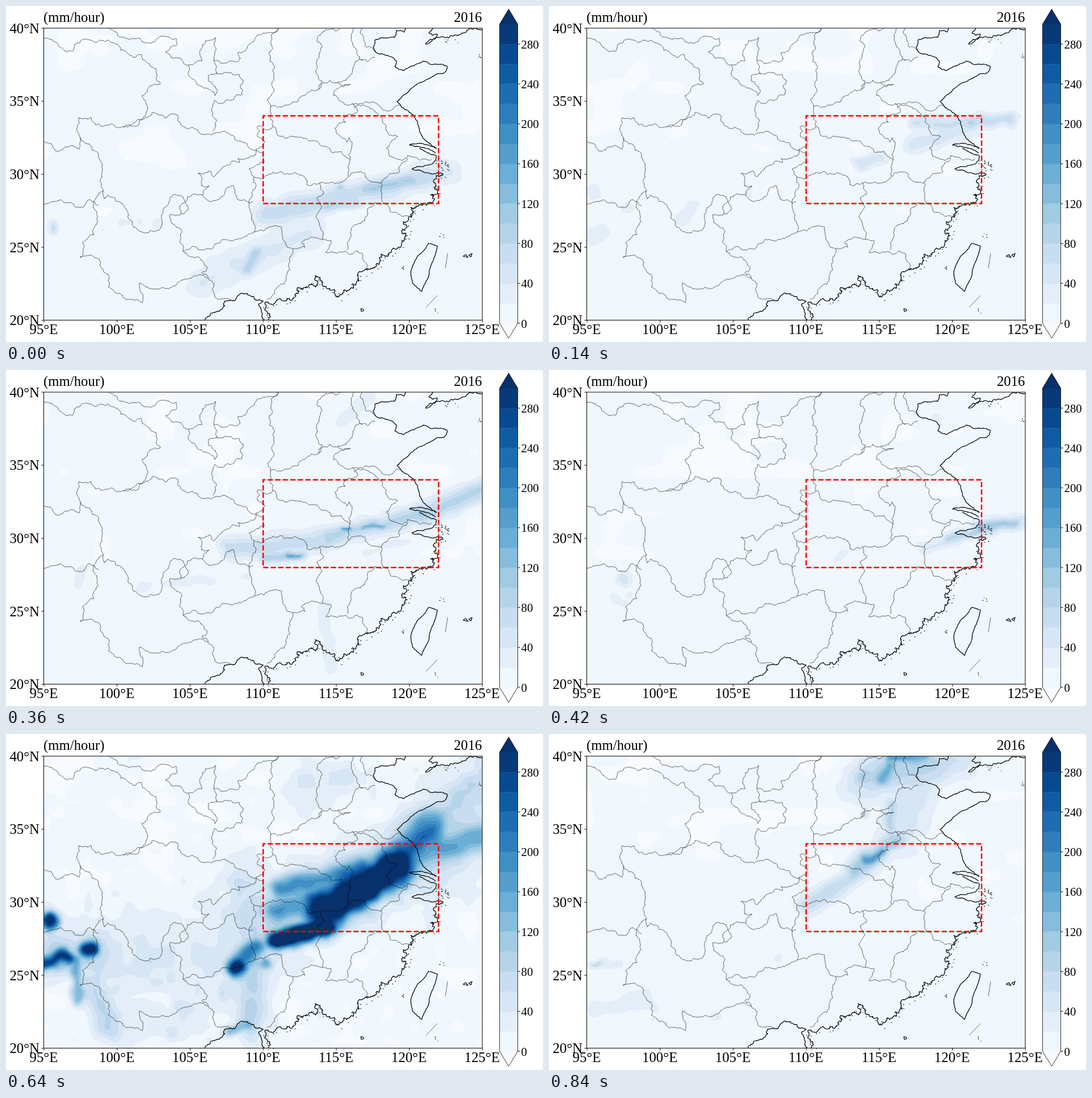
These frames come from a looping animation (946x592 px, 0.98 s). An HTML page with a canvas:

```html
<!DOCTYPE html>
<html lang="en">
<head>
<meta charset="utf-8">
<title>Rainfall map</title>
<style>
html, body { margin: 0; width: 100%; height: 100%; overflow: hidden; background: #fff; }
canvas { position: absolute; left: 67px; top: 39px; }
svg { position: absolute; left: 0; top: 0; }
text { font-family: "Liberation Serif", "Times New Roman", serif; font-size: 24.8px; }
</style>
</head>
<body>
<canvas id="rain" width="772" height="515"></canvas>
<svg id="map" width="946" height="592" viewBox="0 0 946 592"></svg>
<script>
const LEFT = 67, TOP = 39, W = 772, H = 515, DEG = 25.74, HOLD = 140;
const svg = document.getElementById('map');
const ctx = document.getElementById('rain').getContext('2d');

function add(tag, attrs, text) {
  const el = document.createElementNS('http://www.w3.org/2000/svg', tag);
  for (const k in attrs) el.setAttribute(k, attrs[k]);
  if (text) el.textContent = text;
  svg.appendChild(el);
  return el;
}

const mix = (a, b, t) => a + (b - a) * t;
const ease = t => t * t * (3 - 2 * t);
function hash(x, y) {
  const s = Math.sin(x * 127.1 + y * 311.7) * 43758.5453;
  return (s - Math.floor(s)) * 2 - 1;
}
function noise(x, y) {
  const i = Math.floor(x), j = Math.floor(y), u = ease(x - i), v = ease(y - j);
  return mix(mix(hash(i, j), hash(i + 1, j), u), mix(hash(i, j + 1), hash(i + 1, j + 1), u), v);
}

// ---- colour scale: 15 bands of 20, plus one colour beyond each end
const anchors = ['f7fbff', 'deebf7', 'c6dbef', '9ecae1', '6baed6', '4292c6', '2171b5', '08519c', '08306b']
  .map(h => [0, 2, 4].map(i => parseInt(h.slice(i, i + 2), 16)));
function shade(t) {
  const i = Math.min(7, Math.floor(t * 8));
  return anchors[i].map((c, k) => Math.round(mix(c, anchors[i + 1][k], t * 8 - i)));
}
const palette = Array.from({ length: 17 }, (_, k) => shade(Math.min(1, Math.max(0, (k - 0.5) / 15))));
const rgb = k => `rgb(${palette[k]})`;

// ---- rain: bands that fall off smoothly around a segment
const band = (x1, y1, x2, y2, width, peak) => ({ x: x1, y: y1, dx: x2 - x1, dy: y2 - y1, width, peak });
const spot = (x, y, width, peak) => band(x, y, x, y, width, peak);
const showers = (count, x, y, spreadX, spreadY, peak) => Array.from({ length: count }, (_, i) =>
  spot(x + spreadX * hash(i, x), y + spreadY * hash(y, i), 11 + 4 * hash(i, i + 2), peak));

const scenes = [
  { rain: [
    band(460, 366, 740, 303, 21, 64), band(560, 352, 620, 348, 10, 72), band(640, 320, 715, 306, 13, 84),
    band(720, 306, 780, 290, 22, 34), spot(588, 321, 9, 85), band(345, 485, 530, 400, 30, 34),
    band(427, 462, 443, 434, 14, 85), spot(82, 391, 11, 65), ...showers(5, 230, 390, 40, 16, 19)] },
  { rain: [
    band(650, 207, 740, 206, 13, 58), band(740, 207, 815, 197, 13, 68), band(640, 246, 740, 215, 17, 40),
    band(545, 277, 585, 266, 13, 46), band(230, 375, 250, 354, 12, 30), band(75, 405, 92, 398, 15, 26),
    spot(78, 328, 14, 28), spot(138, 355, 11, 30), spot(352, 328, 12, 20)] },
  { rain: [
    band(395, 314, 560, 300, 19, 62), band(455, 328, 520, 327, 10, 88), band(495, 327, 518, 327, 6, 145),
    band(570, 294, 735, 254, 16, 78), band(590, 283, 610, 282, 5, 160), band(630, 278, 662, 275, 5, 135),
    band(735, 254, 840, 212, 20, 78), band(235, 380, 430, 362, 16, 19), band(131, 355, 131, 380, 9, 30),
    band(560, 410, 572, 525, 13, 24), band(635, 320, 710, 300, 13, 17), band(595, 92, 640, 48, 13, 22)] },
  { rain: [
    band(660, 313, 720, 293, 14, 44), band(705, 297, 760, 280, 9, 80), band(755, 278, 820, 270, 9, 98),
    band(750, 280, 840, 266, 14, 58), spot(132, 366, 13, 52), band(510, 332, 522, 322, 8, 22),
    spot(683, 82, 12, 18), ...showers(4, 120, 398, 24, 18, 17)] },
  { base: 8, rough: 13, rain: [
    band(562, 310, 690, 230, 34, 430), band(475, 362, 560, 341, 18, 430), band(440, 375, 412, 402, 19, 200),
    spot(407, 411, 17, 350), band(690, 225, 745, 168, 36, 225), band(740, 212, 850, 174, 30, 140),
    band(750, 165, 845, 75, 42, 72), band(485, 272, 620, 238, 23, 185), band(475, 312, 550, 292, 23, 165),
    band(440, 330, 800, 185, 68, 72), band(410, 250, 450, 300, 38, 48), band(435, 400, 432, 510, 30, 76),
    spot(455, 406, 12, 145), band(392, 522, 430, 512, 10, 135), band(200, 390, 400, 405, 72, 38),
    spot(77, 329, 16, 330), spot(147, 377, 16, 350), band(66, 403, 108, 391, 15, 290),
    band(90, 380, 150, 390, 42, 85), band(124, 395, 128, 466, 12, 135), band(150, 440, 182, 515, 28, 72),
    band(520, 85, 600, 80, 42, 35), band(215, 510, 330, 490, 36, 28), ...showers(12, 270, 460, 160, 70, 46)] },
  { rain: [
    spot(123, 410, 9, 105), band(103, 415, 130, 408, 10, 64), spot(97, 367, 13, 23),
    band(145, 400, 168, 438, 15, 24), band(690, 305, 735, 302, 26, 22), band(735, 300, 742, 335, 14, 34),
    band(597, 381, 614, 374, 8, 21), band(625, 352, 665, 347, 7, 17)] },
  { rain: [
    band(555, 76, 670, 50, 38, 82), band(588, 80, 598, 58, 16, 135), spot(556, 76, 16, 110),
    band(600, 40, 660, 40, 13, 158), band(660, 55, 720, 45, 32, 52), band(602, 165, 604, 125, 14, 76),
    band(620, 175, 650, 85, 38, 44), spot(553, 140, 9, 58), band(455, 300, 555, 238, 20, 74),
    band(535, 240, 608, 188, 17, 100), band(556, 223, 586, 209, 8, 150), band(610, 180, 665, 172, 16, 34),
    band(78, 405, 90, 405, 5, 75), band(75, 405, 118, 405, 9, 34), band(85, 485, 165, 465, 24, 18),
    spot(405, 396, 13, 18), ...showers(5, 230, 500, 70, 26, 16)] }
];

function rainAt(x, y, bands) {
  let sum = 0;
  for (const b of bands) {
    const px = x - b.x, py = y - b.y, len2 = b.dx ** 2 + b.dy ** 2;
    const t = len2 && Math.min(1, Math.max(0, (px * b.dx + py * b.dy) / len2));
    const q = ((px - t * b.dx) ** 2 + (py - t * b.dy) ** 2) / b.width ** 2;
    if (q < 8) sum += (b.peak * Math.exp(-q)) ** 3;
  }
  return Math.cbrt(sum);
}

function paintField({ rain, base = 9, rough = 3 }, seed) {
  const step = 4, cols = W / step + 2, rows = Math.ceil(H / step) + 2;
  const grid = new Float32Array(cols * rows);
  for (let j = 0; j < rows; j++) for (let i = 0; i < cols; i++) {
    const x = LEFT + i * step, y = TOP + j * step;
    const warpX = 5 * noise(x / 19 + seed * 9, y / 19);
    const warpY = 4 * noise(x / 19, y / 19 + seed * 7 + 40);
    const dry = 26 * (1 - j / rows) * Math.max(0, noise(x / 55 + seed * 13, y / 36));
    grid[j * cols + i] = base + rough * noise(x / 24 + seed * 31, y / 20) - dry
      + rainAt(x + warpX, y + warpY, rain);
  }
  const img = ctx.createImageData(W, H);
  for (let y = 0, o = 0; y < H; y++) for (let x = 0; x < W; x++, o += 4) {
    const i = x / step | 0, j = y / step | 0, u = x / step - i, n = j * cols + i;
    const v = mix(mix(grid[n], grid[n + 1], u), mix(grid[n + cols], grid[n + cols + 1], u), y / step - j);
    img.data.set(palette[Math.max(0, Math.min(16, Math.floor(v / 20) + 1))], o);
    img.data[o + 3] = 255;
  }
  return img;
}
const fields = scenes.map(paintField);

// ---- map lines: a few key points, roughened by midpoint displacement
function roughen(a, b, k) {
  const dx = b[0] - a[0], dy = b[1] - a[1];
  if (Math.hypot(dx, dy) < 2.5) return [b];
  const h = hash(a[0] + b[1], a[1] - b[0]) * k;
  const m = [(a[0] + b[0]) / 2 - dy * h, (a[1] + b[1]) / 2 + dx * h];
  return [...roughen(a, m, k), ...roughen(m, b, k)];
}
function line(points, width, k) {
  const keys = points.split(' ').map(s => s.split(',').map(Number));
  const path = keys.flatMap((p, i) => i ? roughen(keys[i - 1], p, k) : [p]);
  add('path', { d: 'M' + path.map(p => p.map(n => n.toFixed(1))).join('L'), fill: 'none', stroke: '#000',
    'stroke-width': width, 'stroke-linejoin': 'round', 'clip-path': 'url(#frame)' });
  return path;
}
const border = points => line(points, 0.6, 0.22);
const coast = (points, k = 0.12) => line(points, 1.25, k);
function islets(count, x, y, spreadX, spreadY) {
  for (let i = 0; i < count; i++)
    add('ellipse', { cx: x + spreadX * hash(i, x), cy: y + spreadY * hash(y, i), rx: 0.9 + 0.5 * hash(i, 3), ry: 0.7 });
}

add('clipPath', { id: 'frame' }).innerHTML = `<rect x="${LEFT}" y="${TOP}" width="${W}" height="${H}"/>`;

// north-west
border('67,57 117,80 120,69 140,58 192,66 202,78 264,110 272,137 240,157 246,167 240,199 222,212 207,213');
border('180,39 222,57 262,63 300,57 301,68 281,80 291,91 322,104 345,97 343,78 370,55 366,95 392,98 413,93 408,83 437,62 480,39');
border('322,104 323,124 347,144 368,158 371,147 357,133 357,122 373,118');
border('366,95 373,120 398,119 419,132 412,142 416,156 395,167 368,166 362,180 365,221');
border('128,197 150,197 170,212 207,213 232,200 258,187 280,198 303,193 303,203 338,219 400,228 425,243 453,262');
border('128,197 130,230 147,243 163,262 172,325');
border('67,239 80,243 95,255 112,247 129,252 130,232');
// south-west
border('67,350 95,341 132,355 148,341 163,352');
border('172,325 163,330 162,380 155,403 135,418 130,443 165,447 180,473 180,495 212,518 240,523 235,488 298,493 356,479 368,512 395,518');
border('172,325 173,340 180,333 209,355 225,390 255,395 271,393 273,370 286,350 297,332 315,342 308,367');
border('346,333 316,345 320,360 288,368 310,398 312,432 333,443 354,463 345,470 356,479');
border('312,432 343,430 372,418 415,410 437,398 470,388 486,390 487,410 505,428');
// centre
border('440,252 440,262 409,268 411,276 366,301 358,290 338,295 344,317 358,317 346,333 360,345 400,316 407,340 435,345');
border('453,262 455,275 428,287 437,302 433,330 430,358 437,398');
border('466,178 470,212 443,212 443,230 456,238 440,252');
border('470,212 492,233 558,247 590,256 606,272 604,300 553,312');
border('437,302 470,293 527,303 530,315 553,312 560,328 548,338 556,355 546,370 557,411');
border('505,428 527,425 520,417 557,411 572,413 563,434 617,432 628,437 636,466');
border('505,428 500,465 490,490 460,517');
// north-east
border('480,39 468,50 463,85 472,130 460,165 466,178 515,168 549,148 557,132 548,105 557,72 548,62 551,52 590,39');
border('613,39 610,68 618,85 637,98 650,90');
border('628,39 630,60 634,72 652,82');
border('549,148 556,137 585,134 617,97 628,95');
border('585,134 607,138 577,158 610,172 655,173 672,185 695,175');
border('610,172 620,185 595,195 598,205 580,215 600,240 604,232 606,272');
border('613,180 655,190 670,220 690,230 670,250 676,265 738,270 750,270');
border('708,268 670,303 661,312 666,348 678,363 718,368');
border('604,300 632,295 643,310 661,312');
border('666,348 637,357 632,378 616,385 602,430');
line('778,436 774,462', 0.6, 0);
line('760,510 740,531', 0.6, 0);

// coasts and islands
coast('704,39 701,46 688,43 685,55 660,56 650,60 647,72 652,82 680,90 688,97 685,107 700,114 712,107 735,97 748,103 777,106 773,117 735,133 700,157 689,168 708,184 727,212 732,228 758,251 725,242 711,245 730,249 757,259');
coast('728,251 757,263 757,272 735,283 715,287 745,294 758,295');
const southCoast = coast('758,295 770,297 757,313 760,328 748,333 755,340 715,372 700,380 706,390 697,397 703,408 660,438 636,465 558,493 545,475 545,495 510,507 462,523 460,540 466,547 462,553', 0.42);
coast('455,553 445,525 453,520 430,510 410,510 385,520 365,540 350,554', 0.25);
coast('752,39 745,48 760,50 739,67 785,52 815,41 839,41', 0.2);
coast('745,418 760,423 747,462 732,503 716,488 714,465 728,438 745,418', 0.07);
coast('805,441 810,438 814,443 805,441', 0);
coast('815,439 821,436 819,442 815,439', 0);
coast('625,533 629,534 630,537 626,538 625,533', 0);
southCoast.forEach(([x, y], i) => { if (i % 5 === 0) islets(1, x + 3, y + 3, 6, 5); });
islets(24, 770, 281, 13, 9);
islets(5, 698, 461, 3, 3);
islets(3, 759, 538, 4, 5);
islets(4, 768, 404, 7, 4);
islets(5, 835, 87, 4, 4);
islets(6, 785, 62, 14, 4);

// ---- axes, labels, study box and colour bar
const thin = { stroke: '#000', 'stroke-width': 1, fill: 'none' };
add('path', { d: 'M453 348H762V193.5H453Z', fill: 'none', stroke: '#f00', 'stroke-width': 2.5, 'stroke-dasharray': '9.25 4' });
add('rect', { x: 66.5, y: 39, width: W + 0.5, height: 514.5, ...thin });
for (let lat = 40; lat >= 20; lat -= 5) {
  const y = TOP + (40 - lat) * DEG;
  add('path', { d: `M62.5 ${y}h4`, ...thin });
  add('text', { x: 59, y: y + 8.5, 'text-anchor': 'end' }, lat + '°N');
}
for (let lon = 95; lon <= 125; lon += 5) {
  const x = LEFT + (lon - 95) * DEG;
  add('path', { d: `M${x} 553.5v4`, ...thin });
  add('text', { x: x - 0.5, y: 578, 'text-anchor': 'middle' }, lon + '°E');
}
add('text', { x: 66, y: 27.5 }, '(mm/hour)');
add('text', { x: 838.5, y: 27.5, 'text-anchor': 'end' }, '2016');

const BAR = 527 / 15;
add('path', { d: 'M869.5 32L885.5 5.5L901.5 32Z', fill: rgb(16) });
add('path', { d: 'M869.5 559L885.5 585.5L901.5 559Z', fill: rgb(0) });
for (let k = 0; k < 15; k++)
  add('rect', { x: 869.5, y: 559 - (k + 1) * BAR, width: 32, height: BAR + 0.3, fill: rgb(k + 1) });
add('path', { d: 'M869.5 32L885.5 5.5L901.5 32V559L885.5 585.5L869.5 559Z', ...thin, 'stroke-width': 0.8 });
for (let v = 0; v <= 280; v += 40) {
  const y = 559 - v / 20 * BAR;
  add('path', { d: `M901.5 ${y}h4`, ...thin });
  add('text', { x: 907.5, y: y + 7.5, style: 'font-size:20.8px' }, String(v));
}

// ---- playback
let shown = -1;
function draw(time) {
  const index = Math.floor(time / HOLD) % fields.length;
  if (index !== shown) ctx.putImageData(fields[index], 0, 0);
  shown = index;
}
const start = performance.now();
function tick() {
  draw(performance.now() - start);
  requestAnimationFrame(tick);
}
tick();
</script>
</body>
</html>
```
